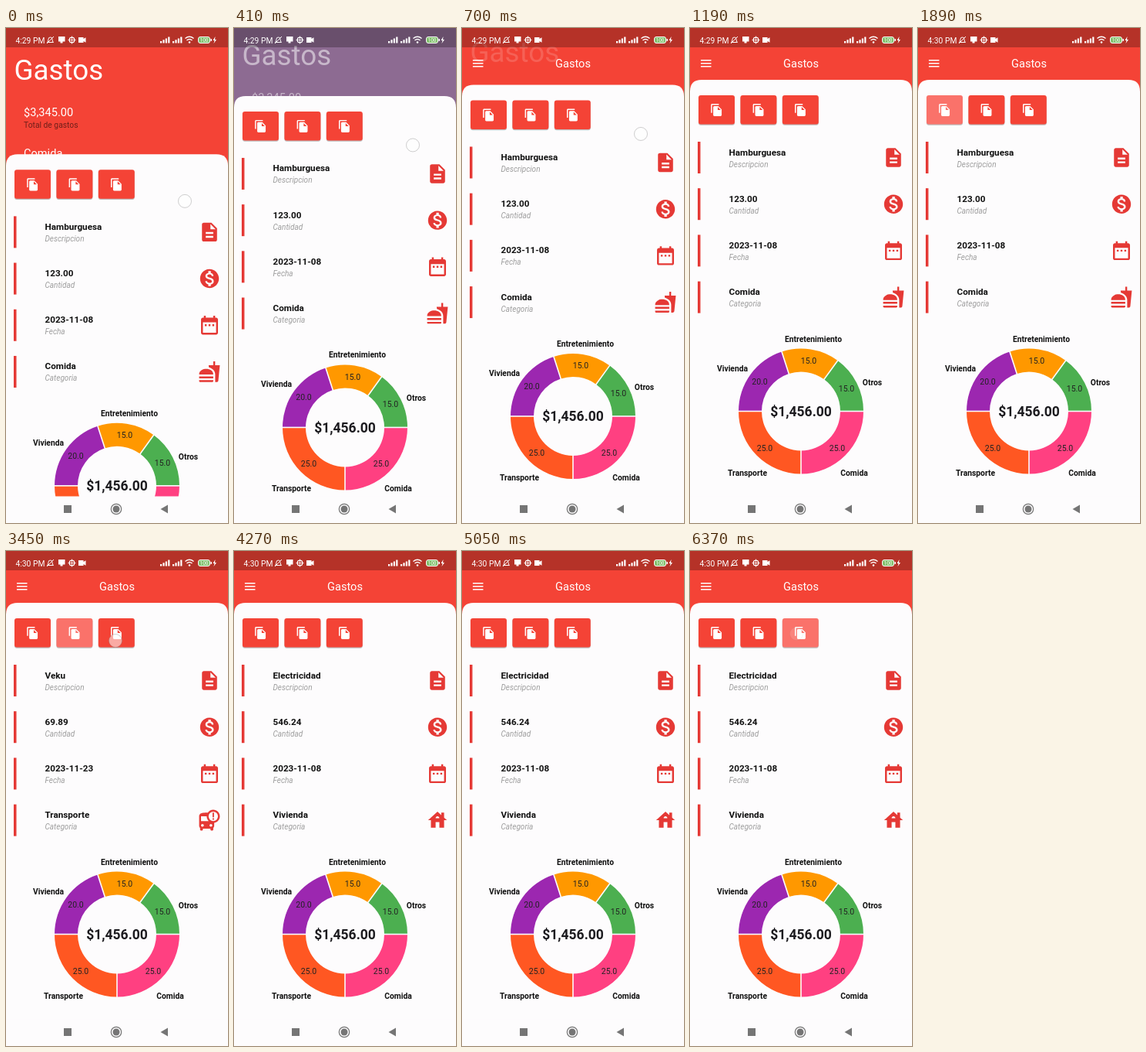
Recreate the animation shown at these times as an HTML page. Size 288 px wide and 640 px high, loop 6.41 s.

```html
<!DOCTYPE html>
<html lang="es">
<head>
<meta charset="utf-8">
<title>Gastos</title>
<style>
  html, body { margin: 0; height: 100%; overflow: hidden; background: #fdfcfd; }
  svg { display: block; width: 100vw; height: 100vh; font-family: Roboto, sans-serif; }
  .white { fill: #fff; }
  .paper { fill: #fdfcfd; }
  .row { font-weight: 700; font-size: 11.7px; fill: #111; }
  .hint { font-style: italic; font-size: 10px; fill: #9e9e9e; }
  .label { font-weight: 700; font-size: 10.3px; text-anchor: middle; fill: #111; }
  .value { font-size: 10.5px; text-anchor: middle; fill: #222; }
  .icon { fill: #e53935; }
</style>
</head>
<body>
<svg viewBox="0 0 288 640">
  <rect id="bar" width="288" height="200"/>
  <g id="header" class="white">
    <text x="10.5" y="66.7" font-size="36.8">Gastos</text>
    <g font-size="14.6">
      <text x="23" y="114">$3,345.00</text>
      <text x="23" y="129" font-size="10.3" fill="#6f1f1a">Total de gastos</text>
      <text x="23" y="167">Comida</text>
    </g>
  </g>
  <rect width="288" height="25" fill="#000" opacity=".26"/>
  <g id="appbar" class="white">
    <path d="M14 41h13.500v1.500H14zM14 45h13.500v1.500H14zM14 49h13.500v1.500H14z"/>
    <text x="144" y="51" font-size="14.6" text-anchor="middle">Gastos</text>
  </g>
  <g class="white">
    <text id="clock" x="12.500" y="19.500" font-size="10.3"></text>
    <path d="M53.500 18.500q1.500-1 1.500-4 0-2.500 2.500-2.500t2.500 2.500q0 3 1.500 4z" fill="none" stroke="#fff"/>
    <path d="M53 20l9-9" stroke="#fff"/>
    <path d="M68 11h8.500v6.500h-3v2h-3v-2H68z"/>
    <path d="M94 12h6.500v2l3-1.700v6.400l-3-1.700v2H94z"/>
    <circle cx="85.500" cy="15.500" r="3.300" fill="none" stroke="#fff" stroke-width="1.300"/>
    <path d="M85.500 10.500v10M80.500 15.500h10" stroke="#fff" stroke-width=".8"/>
    <path id="bars"/>
    <path d="M232.500 13.500q5.500-4.500 11 0M234.500 16q3.500-2.800 7 0" fill="none" stroke="#fff" stroke-width="1.500"/>
    <circle cx="238" cy="18.500" r="1.300"/>
    <rect x="249.500" y="11.500" width="15" height="8" rx="2.500" fill="#7fbf6a" stroke="#fff"/>
    <rect x="265.500" y="14" width="1.500" height="3"/>
    <text x="257" y="18" font-size="6.500" text-anchor="middle">100</text>
    <path d="M271.500 11l-3 5h2l-1 4 3.500-5h-2z"/>
  </g>
  <g id="panel">
    <path class="paper" d="M0 700V82Q0 67 15 67H273Q288 67 288 82V700z"/>
  </g>
  <circle id="touch" r="8.500" fill="#fff" fill-opacity=".55" stroke="#777" stroke-opacity=".35"/>
  <rect class="paper" y="605.500" width="288" height="35"/>
  <g fill="#757575">
    <rect x="75" y="617" width="10" height="10"/>
    <circle cx="143" cy="622" r="6.700" fill="none" stroke="#757575" stroke-width="1.200"/>
    <circle cx="143" cy="622" r="4.500"/>
    <path d="M210 616.500v11l-9.500-5.500z"/>
  </g>
</svg>
<script>
const LOOP = 6410, TRAVEL = 96.5;
const RED = [244, 67, 54], BLUE = [33, 150, 243], PRESSED = [250, 114, 106];
const $ = id => document.getElementById(id);
const clamp = v => Math.max(0, Math.min(1, v));

const ICONS = {
  copy: 'M16 1H4c-1.1 0-2 .9-2 2v14h2V3h12V1zm-1 4l6 6v10c0 1.1-.9 2-2 2H7.99C6.89 23 6 22.1 6 21V7c0-1.1.89-2 1.99-2h7zm-1 7h5.5L14 6.5V12z',
  doc: 'M14 2H6c-1.1 0-2 .9-2 2v16c0 1.1.9 2 2 2h12c1.1 0 2-.9 2-2V8l-6-6zm2 16H8v-2h8v2zm0-4H8v-2h8v2zm-3-5V3.5L18.500 9H13z',
  money: 'M12 2C6.48 2 2 6.48 2 12s4.48 10 10 10 10-4.48 10-10S17.52 2 12 2zm1.410 16.090V20h-2.670v-1.930c-1.710-.36-3.160-1.460-3.270-3.400h1.960c.1 1.050.82 1.870 2.650 1.870 1.960 0 2.400-.98 2.400-1.590 0-.83-.44-1.610-2.670-2.140-2.480-.6-4.180-1.620-4.180-3.670 0-1.720 1.390-2.840 3.110-3.210V4h2.670v1.950c1.860.45 2.790 1.860 2.850 3.390H14.300c-.05-1.110-.64-1.870-2.220-1.870-1.500 0-2.400.68-2.400 1.640 0 .84.65 1.390 2.670 1.910s4.180 1.390 4.180 3.910c-.01 1.830-1.380 2.830-3.120 3.160z',
  date: 'M9 11H7v2h2v-2zm4 0h-2v2h2v-2zm4 0h-2v2h2v-2zm2-7h-1V2h-2v2H8V2H6v2H5c-1.100 0-2 .9-2 2v14c0 1.100.9 2 2 2h14c1.100 0 2-.9 2-2V6c0-1.100-.9-2-2-2zm0 16H5V9h14v11z',
  food: 'M18.060 23h1.660c.84 0 1.530-.64 1.630-1.460L23 5.050h-5V1h-1.970v4.050h-4.970l.3 2.340c1.710.47 3.310 1.320 4.270 2.260 1.440 1.420 2.430 2.890 2.430 5.290V23zM1 22V21h15.030v1c0 .55-.45 1-1 1H2c-.55 0-1-.45-1-1zm15.030-7C16.030 7 1 7 1 15h15.030zM1 17h15v2H1z',
  bus: 'M16 1c-2.400 0-4.520 1.200-5.780 3.020C9.840 4 9.420 4 9 4c-4.420 0-8 .5-8 4v10c0 .88.39 1.670 1 2.220V22c0 .55.45 1 1 1h1c.55 0 1-.45 1-1v-1h8v1c0 .55.45 1 1 1h1c.55 0 1-.45 1-1v-1.780c.61-.55 1-1.340 1-2.220v-3.080c3.390-.49 6-3.390 6-6.920 0-3.870-3.130-7-7-7zM4.500 19a1.500 1.500 0 1 1 0-3 1.500 1.500 0 0 1 0 3zM3 13V8h6c0 1.960.81 3.730 2.110 5H3zm10.500 6a1.500 1.500 0 1 1 0-3 1.500 1.500 0 0 1 0 3zM16 13a5 5 0 1 1 0-10 5 5 0 0 1 0 10zM15.250 4h1.500v5h-1.500zM15.250 10h1.500v1.500h-1.500z',
  house: 'M19 9.300V4h-3v2.600L12 3 2 12h3v8h5v-6h4v6h5v-8h3l-3-2.700zm-9 .7c0-1.100.9-2 2-2s2 .9 2 2h-4z'
};

const ENTRIES = [
  ['Hamburguesa', '123.00', '2023-11-08', 'Comida', 'food'],
  ['Veku', '69.89', '2023-11-23', 'Transporte', 'bus'],
  ['Electricidad', '546.24', '2023-11-08', 'Vivienda', 'house']
];
const HINTS = ['Descripcion', 'Cantidad', 'Fecha', 'Categoria'];

// label, share, colour, label position, value position
const SLICES = [
  ['Vivienda', 20, '#9c27b0', 55, 443.5, 90.5, 460.5],
  ['Entretenimiento', 15, '#ff9800', 160, 405.5, 154, 434],
  ['Otros', 15, '#4caf50', 236.5, 461.5, 203, 469.5],
  ['Comida', 25, '#ff4081', 213, 578.5, 191, 546.5],
  ['Transporte', 25, '#ff5722', 74.5, 578.5, 97, 546.5]
];

// finger drag and settle: time, scroll offset
const SCROLL = [[0, 0], [100, 14], [200, 38], [300, 61], [410, 75.5], [550, 85], [700, 90], [850, 95], [1000, TRAVEL]];

// button, press start, fade start, fade end
const PRESSES = [[0, 1680, 1960, 2250], [1, 3120, 3480, 3720], [2, 3470, 3800, 4150], [2, 6180, 6500, 6600]];

// x, y, start, end
const TAPS = [[34, 108, 1640, 1800], [88, 112, 3060, 3210], [142, 116, 3390, 3560], [138, 107, 6180, 6390]];

function add(tag, attrs, text = '') {
  const el = document.createElementNS('http://www.w3.org/2000/svg', tag);
  for (const k in attrs) el.setAttribute(k, attrs[k]);
  el.textContent = text;
  return $('panel').appendChild(el);
}

function icon(name, x, y, size, cls) {
  const s = size / 24;
  return add('path', {
    d: ICONS[name], class: cls, 'fill-rule': 'evenodd',
    transform: `translate(${x - size / 2} ${y - size / 2}) scale(${s})`
  });
}

const buttons = [0, 1, 2].map(i => {
  const x = 11 + 54.4 * i, box = { x, width: 47, height: 37.5, rx: 3 };
  add('rect', { ...box, y: 88.2, fill: '#000', opacity: .25 });
  const el = add('rect', { ...box, y: 87 });
  icon('copy', x + 23.5, 106, 17.5, 'white');
  return el;
});

const rows = HINTS.map((hint, i) => {
  const y = 147 + 60.2 * i;
  add('rect', { x: 10, y, width: 3.5, height: 41, class: 'icon' });
  const el = add('text', { x: 50.5, y: y + 17.5, class: 'row' });
  add('text', { x: 50.5, y: y + 32.5, class: 'hint' }, hint);
  return el;
});
['doc', 'money', 'date'].forEach((name, i) => icon(name, 264, 167.5 + 60.2 * i, 29.3, 'icon'));
const category = icon('food', 264, 348, 29.3, 'icon');

const polar = (r, a) => `${144 + r * Math.cos(a)} ${495.5 + r * Math.sin(a)}`;
let angle = Math.PI;
for (const [, share, fill] of SLICES) {
  const end = angle + share / 50 * Math.PI;
  add('path', {
    d: `M${polar(81, angle)}A81 81 0 0 1 ${polar(81, end)}L${polar(51, end)}A51 51 0 0 0 ${polar(51, angle)}z`, fill
  });
  angle = end;
}
for (const [name, share, , lx, ly, vx, vy] of SLICES) {
  add('path', { d: `M${polar(50, angle)}L${polar(82, angle)}`, stroke: '#fdfcfd', 'stroke-width': 1.6 });
  angle += share / 50 * Math.PI;
  add('text', { x: lx, y: ly, class: 'label' }, name);
  add('text', { x: vx, y: vy, class: 'value' }, share.toFixed(1));
}
add('text', { x: 144, y: 501.7, 'font-size': 17.5, 'font-weight': 700, 'text-anchor': 'middle', fill: '#1c1b1f' }, '$1,456.00');

let bars = '';
for (const x of [200, 216])
  for (let i = 0; i < 4; i++) bars += `M${x + 3.4 * i} 19.5v${-2.5 - 1.8 * i}h2.2V19.5z`;
$('bars').setAttribute('d', bars);

const mix = (a, b, k) => `rgb(${a.map((v, i) => Math.round(v + (b[i] - v) * k))})`;

function scrollAt(t) {
  const i = SCROLL.findIndex(p => p[0] > t);
  if (i < 0) return TRAVEL;
  const [t0, a] = SCROLL[i - 1], [t1, b] = SCROLL[i];
  return a + (b - a) * (t - t0) / (t1 - t0);
}

function draw(t) {
  const off = scrollAt(t), shift = TRAVEL - off;
  const faded = clamp((off / TRAVEL - .577) / .423);

  // the header fades to a blue bar, which turns red once collapsed
  $('bar').setAttribute('fill', mix(RED, BLUE, off > 80 ? 0 : faded));
  $('header').setAttribute('opacity', 1 - faded);
  $('header').setAttribute('transform', `translate(0 ${-off / 4})`);
  $('appbar').setAttribute('opacity', clamp((t - 475) / 100));
  $('panel').setAttribute('transform', `translate(0 ${shift})`);
  $('clock').textContent = t < 1300 ? '4:29 PM' : '4:30 PM';

  const entry = ENTRIES[t < 3200 ? 0 : t < 3560 ? 1 : 2];
  rows.forEach((el, i) => el.textContent = entry[i]);
  category.setAttribute('d', ICONS[entry[4]]);

  buttons.forEach((el, i) => {
    let glow = 0;
    for (const [b, start, fade, end] of PRESSES)
      if (b === i) glow = Math.max(glow, Math.min(clamp((t - start) / 120), clamp((end - t) / (end - fade))));
    el.setAttribute('fill', mix(RED, PRESSED, glow));
  });

  let touch = [0, 0, 0];
  if (t < 900) touch = [232, 130.5 - 3 * (1 - clamp(off / 40)) + shift, clamp((900 - t) / 80)];
  for (const [x, y, start, end] of TAPS)
    if (t >= start && t < end) touch = [x, y, clamp((end - t) / 80)];
  $('touch').setAttribute('cx', touch[0]);
  $('touch').setAttribute('cy', touch[1]);
  $('touch').setAttribute('opacity', touch[2]);
}

const begin = performance.now();
function tick() {
  draw((performance.now() - begin) % LOOP);
  requestAnimationFrame(tick);
}
tick();
</script>
</body>
</html>
```
